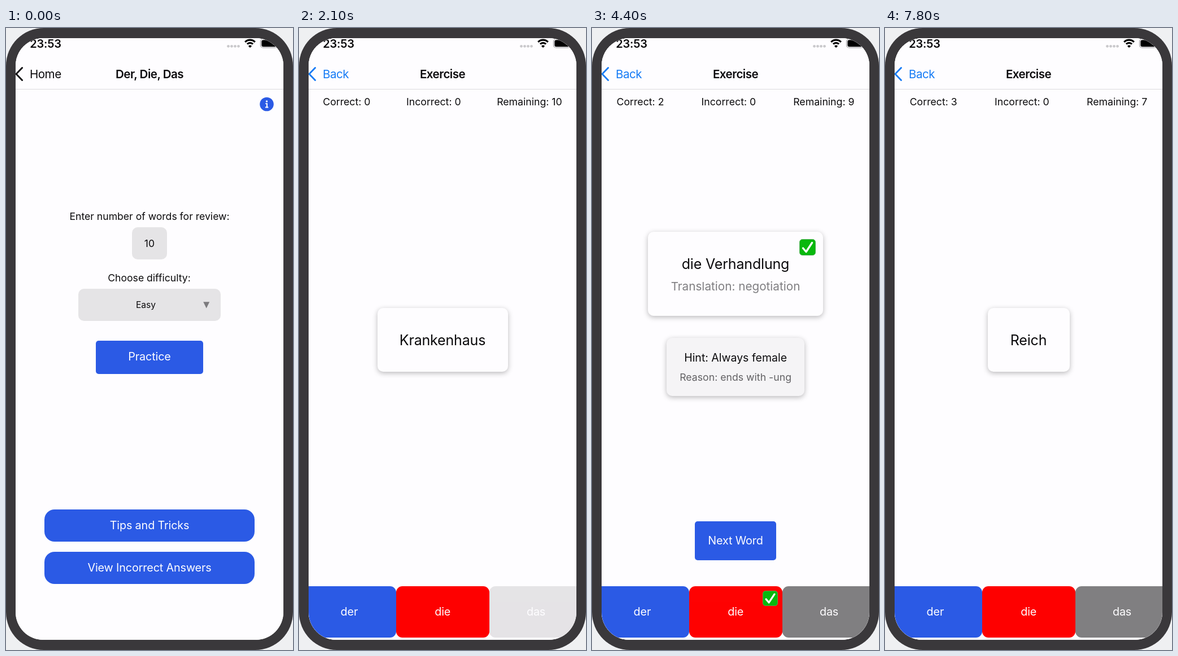
Recreate the animation shown at these times as an HTML page. Size 508 by 1102 pixels, loop 8 s.

```html
<!DOCTYPE html>
<html lang="en">
<head>
<meta charset="utf-8">
<title>Article trainer</title>
<style>
  html, body { margin: 0; width: 100%; height: 100%; overflow: hidden; background: #eff0f2; }
  body { position: relative; font-family: Inter, "Open Sans", sans-serif; color: #0b0a0c; }
  div, svg { position: absolute; box-sizing: border-box; }
  .bezel { left: 0; top: 0; width: 508px; height: 1102px; border-radius: 67px; background: #3a383b; }
  .screen { left: 17px; top: 18px; width: 473.5px; height: 1066px; border-radius: 49px; overflow: hidden; background: #fefdff; }
  .app, .page { left: 0; top: 0; width: 508px; height: 1102px; }
  .app { left: -17px; top: -18px; }
  .dim { inset: 0; background: #000; }
  .head { left: 0; top: 0; width: 508px; height: 109px; background: #fefdff; border-bottom: 1.5px solid #dbdadd; }
  .text { white-space: pre; line-height: 1; transform: translate(-50%, -50%); }
  .start { transform: translate(0, -50%); }
  .nav { font-size: 20.6px; letter-spacing: -.025em; }
  .title { font-size: 20.6px; letter-spacing: -.026em; font-weight: 600; }
  .body { font-size: 17.6px; }
  .action { font-size: 19.8px; letter-spacing: -.007em; color: #fefdff; }
  .word { font-size: 25px; letter-spacing: -.007em; }
  .meaning { font-size: 20.7px; color: #7f7e81; }
  .hint { font-size: 19.5px; }
  .reason { font-size: 17.7px; color: #626164; }
  .counts { left: 10.5px; top: 121px; width: 487px; height: 20px; display: flex; justify-content: space-around; align-items: center; font-size: 17.7px; line-height: 1; white-space: pre; }
  .card { border-radius: 10px; background: #fefdff; box-shadow: 0 2.6px 10px rgba(0, 0, 0, .27); }
</style>
</head>
<body>
<div class="bezel"></div>
<div class="screen"><div class="app" id="app"></div></div>
<script>
const BLUE = '#2b5ae5', RED = '#fe0000', GREY = '#807f81', PALE = '#e5e4e6', LINK = '#177cf5';
const WHITE = '#fefdff', INK = '#0b0a0c';
const LOOP = 8000, STEP = 100, WIDTH = 497;

function el(parent, cls, style = {}, text = '') {
  const d = document.createElement('div');
  d.className = cls;
  d.textContent = text;
  Object.assign(d.style, style);
  parent.append(d);
  return d;
}
const px = v => v + 'px';
const box = (p, x, y, w, h, r, bg, cls = '') =>
  el(p, cls, { left: px(x), top: px(y), width: px(w), height: px(h), borderRadius: px(r), background: bg });
const label = (p, cls, x, y, text) => el(p, 'text ' + cls, { left: px(x), top: px(y) }, text);

function button(p, x, y, w, h, r, bg, text) {
  const b = box(p, x, y, w, h, r, bg);
  label(b, 'action', w / 2, h / 2, text);
  return b;
}
function page() {
  const p = el(app, 'page');
  box(p, 5.5, 0, WIDTH, 1102, 0, WHITE);
  return p;
}
function drawing(p, x, y, w, h, view, body) {
  const d = box(p, x, y, w, h, 0, 'none');
  d.innerHTML = `<svg width="${w}" height="${h}" viewBox="${view}">${body}</svg>`;
  return d;
}
const tick = (p, x, y, s) => drawing(p, x, y, s, s, '0 0 29 29',
  `<rect x=".5" y=".5" width="28" height="28" rx="5" fill="#08b80d" stroke="#4fae55"/>
   <path d="M6.5 16 L12 22.5 L22.5 6.5" fill="none" stroke="#fff" stroke-width="3.4" stroke-linecap="round" stroke-linejoin="round"/>`);
const chevron = (p, color) => drawing(p, 10, 64, 30, 36, '10 64 30 36',
  `<path d="M28.6 70.5 L18 81.5 L28.6 92.5" fill="none" stroke="${color}" stroke-width="2.9" stroke-linecap="round" stroke-linejoin="round"/>`);

const app = document.getElementById('app');

// Start page
const home = page();
drawing(home, 449, 122, 25, 26, '449 122 25 26',
  `<circle cx="461.5" cy="135" r="12.3" fill="${BLUE}"/><circle cx="461.5" cy="130" r="1.7" fill="#fff"/>
   <path d="M459.3 134 H461.9 V140.5 M458.9 140.6 H464.3" fill="none" stroke="#fff" stroke-width="2"/>`);
label(home, 'body', 254, 333.5, 'Enter number of words for review:');
box(home, 223, 353, 62, 56.5, 10, PALE);
label(home, 'body', 254, 381.5, '10');
label(home, 'body', 253.5, 443, 'Choose difficulty:');
box(home, 128, 462, 252, 57, 10, PALE);
label(home, 'body', 247.5, 491, 'Easy').style.fontSize = '15.6px';
drawing(home, 349, 485, 12, 12, '0 0 12 12', '<path d="M.2 .3 H11.2 L5.7 11.6 Z" fill="#7c7b7e"/>');
const practice = button(home, 159, 553.5, 190, 59.5, 5, BLUE, 'Practice');
button(home, 68, 853, 372, 57, 18, BLUE, 'Tips and Tricks');
button(home, 68, 928, 372, 57, 18, BLUE, 'View Incorrect Answers');
const dim = el(home, 'dim');

// Exercise page
const quiz = page();
const counts = el(quiz, 'counts');
const tally = [0, 1, 2].map(() => counts.appendChild(document.createElement('span')));
const card = box(quiz, 0, 0, 0, 0, 10, '', 'card');
const word = label(card, 'word', 0, 56.5, '');
const meaning = label(card, 'meaning', 0, 97, '');
const cardTick = tick(card, 0, 13, 29);
const hint = box(quiz, 132.3, 549, 243.5, 103, 10, '#f5f4f6', 'card');
label(hint, 'hint', 121.8, 35.5, 'Hint: Always female');
label(hint, 'reason', 121.8, 70, 'Reason: ends with -ung');
const next = button(quiz, 182, 874, 144, 69, 5, BLUE, 'Next Word');
const choices = [['der', BLUE], ['die', RED], ['das', GREY]].map(([name, bg], i) => {
  const b = button(quiz, 6.3 + 165.3 * i, 989, 165.3, 91, 11, bg, name);
  return { name, b, mark: tick(b, 130, 8, 27) };
});

// Navigation and status bars
el(app, 'head');
const backBlue = chevron(app, LINK), backBlack = chevron(app, INK);
const homeLabel = label(app, 'nav start', 42, 81.5, 'Home');
const backLabel = label(app, 'nav start', 42, 81.5, 'Back');
backLabel.style.color = LINK;
const homeTitle = label(app, 'title', 254, 81.5, 'Der, Die, Das');
const quizTitle = label(app, 'title', 254, 81.5, 'Exercise');
const clock = label(app, 'title', 70, 28, '23:53');
clock.style.fontSize = '20px';
clock.style.letterSpacing = '-.01em';
drawing(app, 388, 18, 100, 20, '388 18 100 20',
  [393.5, 399.5, 405.5, 411.5].map(x => `<circle cx="${x}" cy="32.3" r="2.4" fill="#cac9cc"/>`).join('') +
  `<path d="M423.2 24.8 A12.2 12.2 0 0 1 440.8 24.8 M426.9 28.5 A7 7 0 0 1 437.1 28.5" fill="none" stroke="#000" stroke-width="3.2"/>
   <path d="M432 35 L428.9 31.9 A4.4 4.4 0 0 1 435.1 31.9 Z"/>
   <rect x="450.5" y="19.5" width="30" height="15.5" rx="4.5" fill="none" stroke="#9b9a9d" stroke-width="1.2"/>
   <rect x="452.3" y="21.3" width="26.4" height="12" rx="3"/>`);

// A tap acts after REACT ms; its button starts to recover at HOLD and takes FADE.
const REACT = 100, HOLD = 167, FADE = 250;

// Per word: times of the answer tap and the next tap, and the two card widths
const rounds = [
  { tap: 2100, next: 2800, art: 'das', noun: 'Krankenhaus', en: 'hospital', w: 231, open: 282, y: 432 },
  { tap: 4000, next: 5000, art: 'die', noun: 'Verhandlung', en: 'negotiation', w: 227, open: 310, y: 361, hint: true },
  { tap: 6000, next: 6800, art: 'die', noun: 'Bildung', en: 'education', w: 167, open: 297, y: 361, hint: true },
  { tap: LOOP, next: LOOP, art: 'das', noun: 'Reich', en: '', w: 145, open: 0, y: 432 }
];

const clamp = v => Math.min(1, Math.max(0, v));
const ease = v => v < .5 ? 2 * v * v : 1 - 2 * (1 - v) ** 2;
const touch = (t, tap) => t < tap ? 1 : .2 + .8 * ease(clamp((t - tap - HOLD) / FADE));
const show = (e, on) => { e.style.display = on ? '' : 'none'; };
const shift = (e, x) => { e.style.translate = px(x); };

// Critically damped spring, stiffness 1000 and mass 3
function spring(ms) {
  const u = Math.max(0, ms) / 1000 * Math.sqrt(1000 / 3);
  return 1 - (1 + u) * Math.exp(-u);
}

function push(t) {
  const p = spring(t - 637);
  const q = clamp(p / .98);
  practice.style.opacity = touch(t, 300);
  shift(home, -.3 * WIDTH * p);
  shift(quiz, WIDTH * (1 - p));
  dim.style.opacity = .1 * p;
  shift(homeLabel, -90 * q);
  shift(homeTitle, -185 * q);
  shift(backLabel, 170 * (1 - q));
  shift(quizTitle, 250 * (1 - q));
  for (const e of [homeLabel, homeTitle]) e.style.opacity = clamp(1 - 1.6 * q);
  for (const e of [backLabel, quizTitle]) e.style.opacity = clamp(1.6 * q - .6);
  backBlack.style.opacity = 1 - q;
  backBlue.style.opacity = q;
}

function exercise(t) {
  const n = rounds.findIndex(r => t < r.next + REACT);
  const r = rounds[n], done = t >= r.tap + REACT;
  const w = done ? r.open : r.w;
  tally[0].textContent = 'Correct: ' + (n + done);
  tally[1].textContent = 'Incorrect: 0';
  tally[2].textContent = 'Remaining: ' + (10 - n);
  Object.assign(card.style, {
    left: px(254 - w / 2), top: px(done ? r.y : 496), width: px(w), height: px(done ? 149 : 113)
  });
  word.textContent = done ? r.art + ' ' + r.noun : r.noun;
  word.style.left = meaning.style.left = px(w / 2);
  meaning.textContent = 'Translation: ' + r.en;
  cardTick.style.left = px(w - 42.5);
  for (const e of [meaning, cardTick, next]) show(e, done);
  show(hint, done && r.hint);
  next.style.opacity = t >= r.next ? .2 : 1;
  for (const c of choices) {
    const hit = c.name === r.art;
    c.b.style.opacity = hit ? touch(t, r.tap) : 1;
    show(c.mark, hit && done);
  }
}

const begin = performance.now();
function frame() {
  const now = (performance.now() - begin) % LOOP;
  const t = Math.floor(now / STEP) * STEP;
  push(t);
  exercise(t);
  requestAnimationFrame(frame);
}
frame();
</script>
</body>
</html>
```
